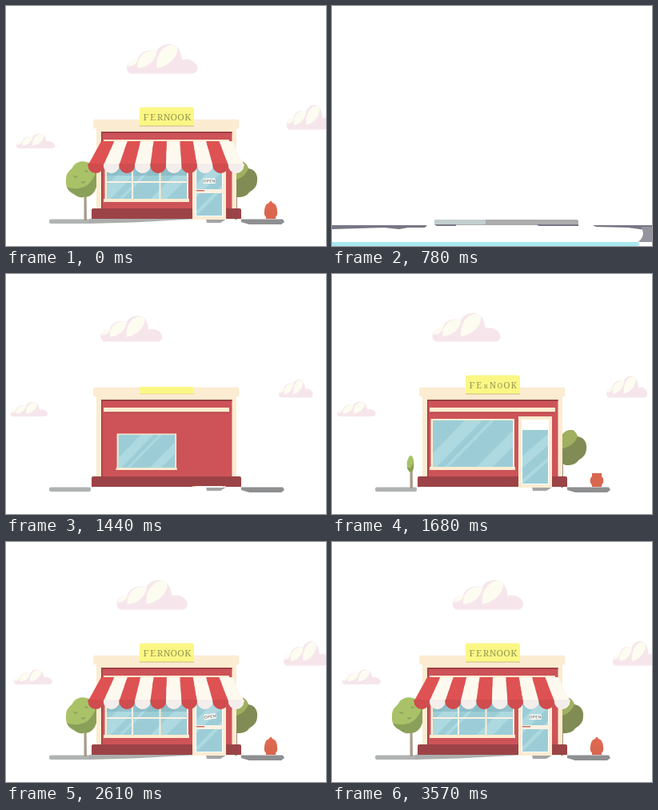
These frames come from a looping animation (400x300 px, 3600 ms). An HTML page:

```html
<!DOCTYPE html>
<html lang="en">
<head>
<meta charset="utf-8">
<title>Little store</title>
<style>
  html, body { margin: 0; width: 100%; height: 100%; overflow: hidden; background: #fff; }
  svg { display: block; width: 100vw; height: 100vh; }
  #letters { font: 11.5px "Noto Serif", serif; fill: #969850; text-anchor: middle; }
  #open text { font: bold 5px Lato, sans-serif; fill: #6f8288; text-anchor: middle; letter-spacing: .3px; }
</style>
</head>
<body>
<svg viewBox="0 0 400 300">
  <defs>
    <g id="cloud">
      <path fill="#f6e6ec" d="M4 37C-1 35-2 28 3 23 6 19 10 20 13 19 16 9 27 6 37 9 41-1 60-5 66 9 68 14 68 17 69 20 79 16 89 25 88 31 87 37 82 37 80 37Z"/>
      <path fill="#fdfcf1" d="M1 28Q3 18 14 19 11 28 1 28ZM13 30C12 14 24 6 37 9 37 18 27 30 13 30ZM37 30C35 10 50-4 62 3 66 12 54 28 37 30Z"/>
    </g>
    <clipPath id="pane"><path d="M126 183H226V241H126Z"/></clipPath>
    <clipPath id="doorPane"><path d="M238 184H270V262H238Z"/></clipPath>
    <clipPath id="leftLeaves"><path id="leaves" d="M75 217C75 208 80 206 83 202 86 195 95 193 101 195 110 197 114 207 114 217 114 230 108 239 97 239 90 240 87 236 83 234 78 231 74 226 75 217Z"/></clipPath>
  </defs>

  <g id="clouds">
    <use href="#cloud" id="cloudA"/><use href="#cloud" id="cloudB"/><use href="#cloud" id="cloudC"/>
  </g>

  <g id="horizon">
    <path id="lineL" fill="#777785" d="M0 274H119L116 277H95L84 279 65 277 0 279Z"/>
    <path id="lineR" fill="#777785" d="M326 274H400V281L370 277 330 276Z"/>
    <path id="curb" fill="#9494a0" d="M386 276H400V295H383Q393 286 386 276Z"/>
    <path id="water" fill="#a8e8f1" d="M0 295H382Q386 297 382 300H0Z"/>
  </g>

  <g id="bar">
    <rect x="128" y="267" width="180" height="7" rx="2" fill="#acacac"/>
    <path fill="#c3cecf" d="M130 267H192V273H128V269Z"/>
    <path fill="#777785" d="M128 273H155V275H131ZM256 273H308V275H258Z"/>
  </g>

  <g id="ground">
    <rect x="54" y="266.500" width="52" height="5.500" rx="2" fill="#b0b3b3"/>
    <path fill="#8d8f90" d="M294 266.500H346L348 270 344 273H304L294 270Z"/>
    <path fill="#a4a4a6" d="M250 266H276L268 271H251Z"/>
    <path id="shadow" fill="#abadad" d="M104 266H240L160 270.500 104 272Z"/>
  </g>

  <g id="store">
    <g id="treeL">
      <path fill="#a99c8b" d="M97.500 232H100.500L101 268H97.500Z"/>
      <g id="crownL">
        <use href="#leaves" fill="#a9c268"/>
        <path clip-path="url(#leftLeaves)" fill="#8a9f59" d="M114 202C108 226 94 232 74 226V241H116Z"/>
        <path fill="#8a9f59" d="M83 212l7 1-3 2ZM93 220l7-1-3 3ZM98 205l6 2-4 1Z"/>
      </g>
    </g>
    <path id="trunkR" fill="#a2907e" d="M286 225H289V267H286Z"/>
    <g id="crownR">
      <path fill="#808c54" d="M279 217C279 203 287 194 296 195 301 197 302 201 303 203 311 204 315 211 314 218 314 227 308 230 304 233 300 239 293 239 288 239 282 237 279 227 279 217Z"/>
      <path fill="#a0af60" d="M279 217C279 203 287 194 296 195 301 197 302 201 303 203 300 212 291 218 279 219Z"/>
    </g>

    <g id="hydrant">
      <path id="tank" fill="#d9674f" d="M325 249H337V253Q340 255 339 261L337 264V266H325V264L323 261Q322 255 325 253Z"/>
      <path id="cap" fill="#e06750" d="M323 255Q324 247 329 246 331 241 333 246 338 247 339 255Z"/>
    </g>

    <rect id="wall" fill="#fcecd1" rx="1.500"/>
    <g id="front">
      <path fill="#cd5358" d="M119 157H282.500V254H119Z"/>
      <path fill="#9c4247" d="M119 157H282.500V159H120.500V254H119Z"/>
      <path fill="#fcecd1" d="M122 167H279V172.500H122Z"/>
      <path fill="#b5484d" d="M122 172.500H279V174H122Z"/>
    </g>
    <rect id="cornice" x="109.500" y="142" width="181.500" height="11" rx="2" fill="#fcecd1" stroke="#f3e3ca" stroke-width=".4"/>

    <g id="window">
      <path fill="#fcecd1" d="M123.500 181H228V241H229V245H122V241H123.500Z"/>
      <g clip-path="url(#pane)">
        <path fill="#9ccdd7" d="M126 183H226V241H126Z"/>
        <path fill="#aed9e0" d="M126 224L166 183H188L131 241H126ZM141 241L198 183H203L146 241ZM181 241L226 196V216L201 241Z"/>
        <path id="gap" fill="#fff" d="M226 195L218 203 208 207 212 212 203 222 206 232 204 241H226Z"/>
        <path id="shade" fill="#7fb2bd" opacity=".55" d="M126 183H226V212H126Z"/>
        <path id="rail" fill="#fcf1e1" d="M126 219H226V221H126Z"/>
        <path id="postL" fill="#fcf1e1" d="M157 183H159V241H157Z"/>
        <rect id="postR" fill="#fcecd1" y="183" height="58"/>
      </g>
    </g>

    <path id="base" fill="#9c4347" d="M107 255Q107 253 109 253H292Q294 253 294 255V266H107Z"/>

    <g id="door">
      <path fill="#fcecd1" d="M233 178H275V267H233Z"/>
      <path fill="#fff" d="M237 182H271V263H237Z"/>
      <g id="doorGlass" clip-path="url(#doorPane)">
        <path fill="#9ccdd7" d="M238 184H270V262H238Z"/>
        <path fill="#aed9e0" d="M238 222L270 190V207L238 239ZM238 256L270 224V230L238 262Z"/>
      </g>
      <g id="doorRail">
        <path fill="#fcf1e1" d="M237 229H271V234H237Z"/>
        <path fill="#c96d63" d="M238 230H248V231.500H238Z"/>
      </g>
    </g>
    <g id="open">
      <rect x="-7.500" y="-3.300" width="15" height="6.600" rx=".6" fill="#fffaf1"/>
      <text y="1.800">OPEN</text>
    </g>

    <g id="awning"></g>

    <g id="sign">
      <rect x="167" y="126.500" width="68" height="23.500" rx="3" fill="#fbf785"/>
      <path fill="#c8bd88" d="M167 149.500H235V150.500H167Z"/>
    </g>
    <g id="letters"></g>
  </g>
</svg>
<script>
const LOOP = 3600, REBUILD = 1050, STRIPES = 10;
const $ = id => document.getElementById(id);
const set = (id, attrs) => {
  for (const name in attrs) $(id).setAttribute(name, attrs[name]);
};
const span = (t, a, b) => Math.min(1, Math.max(0, (t - a) / (b - a)));
const smooth = (t, a, b) => { const x = span(t, a, b); return x * x * (3 - 2 * x); };
const out = (t, a, b) => 1 - (1 - span(t, a, b)) ** 3;
const mix = (a, b, x) => a + (b - a) * x;
const scaleAt = (x, y, sx, sy) => `translate(${x} ${y}) scale(${sx} ${sy}) translate(${-x} ${-y})`;
const grow = (id, x, y, sx, sy = sx) => set(id, { transform: scaleAt(x, y, sx, sy) });
const shift = (id, x, y) => set(id, { transform: `translate(${x} ${y})` });

function add(parent, tag, text = '') {
  const el = document.createElementNS('http://www.w3.org/2000/svg', tag);
  el.textContent = text;
  return $(parent).appendChild(el);
}

const letters = [...'FERNOOK'].map(c => add('letters', 'text', c));
const stripes = Array.from({ length: STRIPES }, (_, i) => {
  const cloth = add('awning', 'path'), valance = add('awning', 'path');
  cloth.setAttribute('fill', i % 2 ? '#fef9ee' : '#df5253');
  valance.setAttribute('fill', i % 2 ? '#f3eeeb' : '#d04c4e');
  return { cloth, valance };
});

function drawCloud(id, t, left, bottom, speed, lag, pace, w, h) {
  const age = Math.max(0, t - REBUILD);
  const x = left + speed * (t - 3570) - lag * Math.exp(-age / 160);
  const size = 1 - Math.exp(-age / pace);
  set(id, { transform: `translate(${x} ${bottom - 37 * h * size}) scale(${w * size} ${h * size})` });
}

function drawAwning(t) {
  stripes.forEach(({ cloth, valance }, i) => {
    const start = 1680 + 30 * i, d = smooth(t, start, start + 280);
    const top = 119 + 16.4 * i, x = mix(top, 102.5 + 19.5 * i, d);
    const w = mix(16.4, 19.5, d), y = 169 + 30 * d;
    const arc = `a${w / 2} ${10 * d} 0 0 1 ${-w} 0Z`;
    cloth.setAttribute('d', d ? `M${top} 169h16.4L${x + w} ${y}${arc}` : '');
    valance.setAttribute('d', d ? `M${x} ${y - 2 * d}h${w}v${2 * d}${arc}` : '');
  });
}

function draw(now) {
  const time = now % LOOP, leaving = time < REBUILD;
  // The finished store carries over the loop point until it has folded away.
  const t = leaving ? time + LOOP : time;
  const fold = leaving ? 1 - smooth(time, 30, 510) : 1;

  set('clouds', { opacity: leaving ? 1 - span(time, 30, 480) : span(t, REBUILD, 1350) });
  drawCloud('cloudA', t, 151, 84.5, .0128, 60, 190, 1, 1);
  drawCloud('cloudB', t, 13, 178, .0032, 6, 115, .545, .5);
  drawCloud('cloudC', t, 351, 154.5, .0038, 20, 290, .65, .82);

  const away = 1 - smooth(time, 480, 780) + smooth(time, 780, 1080);
  set('horizon', { visibility: away < 1 ? 'visible' : 'hidden' });
  shift('lineL', -120 * away, 0);
  shift('lineR', 76 * away, 0);
  shift('curb', 18 * away, 0);
  shift('water', 0, 6 * away);

  const spread = smooth(t, REBUILD, 1200);
  if (leaving) grow('bar', 218, 267, smooth(time, 300, 520), 1);
  else grow('bar', mix(218, 103, spread), 267, mix(1, 1.2, spread), 1 - smooth(t, 1250, 1420));
  grow('ground', 200, 267, leaving ? fold : out(t, REBUILD, 1190), 1);
  grow('shadow', 104, 266, smooth(t, 1680, 1950), 1);

  set('store', { visibility: fold > 0 ? 'visible' : 'hidden' });
  grow('store', 0, 267, 1, fold);

  const settle = smooth(t, 1250, 1400), height = 111 * smooth(t, 1080, 1310);
  set('wall', { x: 107 + 6 * settle, width: 187 - 12 * settle, y: 253 - height, height });
  grow('base', 200.5, 266, out(t, 1060, 1150) * mix(1.054, 1, settle), out(t, 1060, 1150));
  set('cornice', { opacity: settle });
  grow('front', 200, 254, 1, out(t, 1300, 1450));
  grow('window', 176, 245, out(t, 1390, 1540));
  grow('door', 254, 267, 1, out(t, 1440, 1590));
  grow('doorGlass', 254, 262, 1, smooth(t, 1520, 1730));
  grow('doorRail', 237, 231, out(t, 1780, 1900), 1);

  grow('sign', 201, 150, 1, out(t, 1420, 1560));
  letters.forEach((el, i) => {
    const start = 1550 + (i * 3 % 7) * 14;
    el.setAttribute('transform', `translate(${175 + 8.7 * i} 142.5) scale(${out(t, start, start + 150)})`);
  });

  const leaf = smooth(t, 1650, 2200);
  grow('treeL', 99, 268, 1, out(t, 1590, 1680));
  set('crownL', { transform: `translate(0 ${8 * (1 - out(t, 1680, 1950))}) ${scaleAt(99, 240, .1 + .9 * out(t, 1670, 1900), mix(.45, 1, leaf))}` });
  const sprout = out(t, 1480, 1660);
  grow('trunkR', 288, 267, 1, sprout);
  set('crownR', { transform: `translate(${4 * (1 - smooth(t, 1700, 1900))} 0) ${scaleAt(288, 240, sprout, sprout)}` });

  grow('tank', 331, 266, 1, out(t, 1570, 1670));
  const drop = span(t, 1980, 2160), lift = 1 - drop, capSize = .4 + .6 * drop;
  set('cap', {
    transform: `translate(${2 * lift} ${-28 * (1 - drop ** 2)}) rotate(${-50 * lift} 331 249) ${scaleAt(331, 249, capSize, capSize)}`,
    visibility: drop && fold ? 'visible' : 'hidden'
  });

  grow('rail', 126, 220, smooth(t, 1840, 2080), 1);
  grow('postL', 158, 183, 1, out(t, 2060, 2200));
  const band = out(t, 1860, 1960) * mix(16, 2, smooth(t, 2010, 2180));
  set('postR', { x: mix(191, 192.5, smooth(t, 2010, 2180)) - band / 2, width: band });
  set('gap', { opacity: t > 1960 && t < 2080 ? 1 : 0 });
  set('shade', { opacity: .55 * smooth(t, 1900, 2150) });

  const swing = -36 * Math.exp((2010 - t) / 400) * Math.cos((t - 2010) * Math.PI / 300);
  const lean = Math.abs(swing);
  set('open', { transform: `translate(${254 + .14 * lean} ${218.8 - .08 * lean}) rotate(${swing}) scale(${out(t, 1830, 1960)})` });

  drawAwning(t);
}

function tick() {
  draw(performance.now());
  requestAnimationFrame(tick);
}
tick();
</script>
</body>
</html>
```
